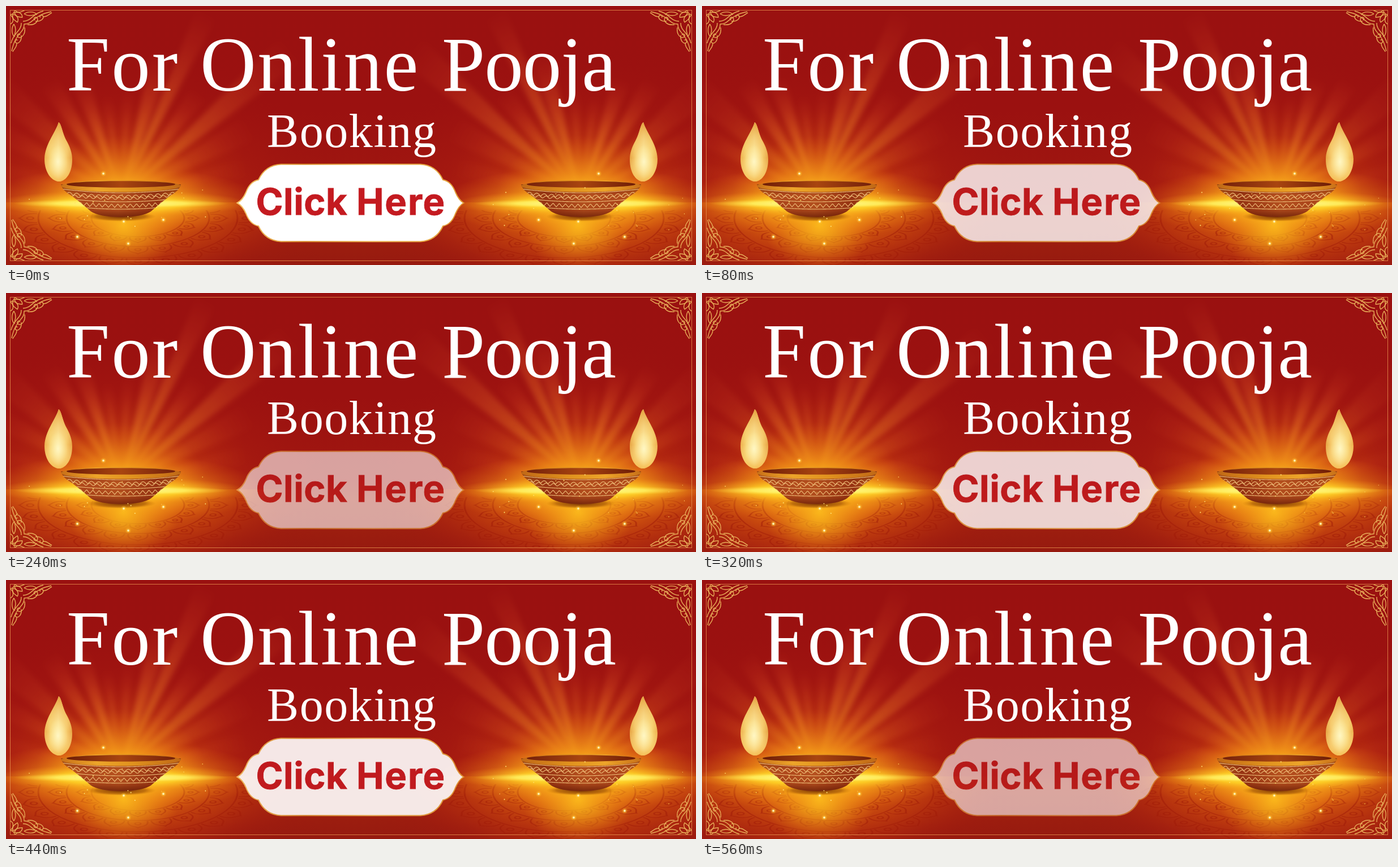
Recreate the animation shown at these times as an HTML page with a canvas. Size 1219 by 459 pixels, loop 0.6 s.

```html
<!DOCTYPE html>
<html lang="en">
<head>
<meta charset="utf-8">
<title>Online Pooja Booking</title>
<style>
  html, body { margin: 0; width: 100%; height: 100%; overflow: hidden; background: #9b1211; }
  canvas, svg { position: absolute; left: 0; top: 0; width: 1219px; height: 459px; }
  .title { font-family: "Liberation Serif", "Times New Roman", serif; fill: #fff; }
  .label { font: 700 65px Inter, sans-serif; fill: #c41a20; stroke: #c41a20; stroke-width: .8; }
  /* Each leg runs 200 ms in five hard steps */
  #button { animation: blink 600ms steps(5, end) infinite; }
  @keyframes blink {
    0% { opacity: 1; }
    33.3333% { opacity: .5; }
    66.6667% { opacity: 1; }
    100% { opacity: .5; }
  }
</style>
</head>
<body>
<canvas id="scene" width="1219" height="459"></canvas>
<svg viewBox="0 0 1219 459">
  <defs>
    <linearGradient id="gold" x1="0" x2="1" y1="0" y2="0">
      <stop offset="0" stop-color="#f3c468"/>
      <stop offset=".3" stop-color="#d98a26"/>
      <stop offset=".6" stop-color="#efb653"/>
      <stop offset="1" stop-color="#e09a35"/>
    </linearGradient>
  </defs>
  <g class="title">
    <g font-size="137">
      <text x="107" y="150" letter-spacing="3">For</text>
      <text x="343" y="150" letter-spacing="2.500">Online</text>
      <text x="770" y="150" letter-spacing="-1">Pooja</text>
    </g>
    <text x="461" y="250" font-size="84" letter-spacing="1.600">Booking</text>
  </g>
  <g id="button">
    <path fill="#fff" stroke="url(#gold)" stroke-width="2" d="M408.500 349
      Q418 344 424 330 Q431 311 446 308 Q458 282 486 280.500 H732
      Q760 282 772 308 Q787 311 794 330 Q800 344 808.500 349
      Q800 354 794 368 Q787 387 772 390 Q760 416 732 417.500 H486
      Q458 416 446 390 Q431 387 424 368 Q418 354 408.500 349Z"/>
    <text class="label" x="441.500" y="370" letter-spacing=".5">Click</text>
    <text class="label" x="619" y="370" letter-spacing="1.800">Here</text>
  </g>
</svg>
<script>
const W = 1219, H = 459, TAU = Math.PI * 2;
const CX = 203; // middle of the left lamp
const c = document.getElementById('scene').getContext('2d');

let seed = 7;
const rand = () => (seed = seed * 16807 % 2147483647) / 2147483647;

function gradient(g, stops) {
  stops.forEach(([at, color]) => g.addColorStop(at, color));
  return g;
}

// Soft elliptical light
function glow(x, y, rx, ry, stops) {
  c.save();
  c.translate(x, y);
  c.scale(rx, ry);
  c.fillStyle = gradient(c.createRadialGradient(0, 0, 0, 0, 0, 1), stops);
  c.beginPath();
  c.arc(0, 0, 1, 0, TAU);
  c.fill();
  c.restore();
}

function ellipse(x, y, rx, ry, fill) {
  c.beginPath();
  c.ellipse(x, y, rx, ry, 0, 0, TAU);
  if (fill) { c.fillStyle = fill; c.fill(); } else c.stroke();
}

function backdrop() {
  c.fillStyle = gradient(c.createLinearGradient(0, 0, 0, H), [
    [0, '#9a1110'], [.4, '#9b1110'], [.72, '#a01710'], [.8, '#a5220f'], [1, '#961a0f']]);
  c.fillRect(0, 0, W, H);
}

function rays() {
  // direction in degrees, half width in degrees, reach, strength
  const beams = [
    [-168, 4, 230, .16], [-152, 4, 250, .24], [-138, 5, 300, .22], [-122, 4, 240, .42],
    [-109, 4, 220, .5], [-98, 3, 180, .35], [-86, 3, 190, .3], [-74, 4, 270, .45],
    [-65, 3, 360, .42], [-53, 4, 230, .4], [-41, 4, 400, .34], [-28, 5, 260, .22], [-13, 4, 230, .16]];
  c.save();
  c.globalCompositeOperation = 'screen';
  c.filter = 'blur(5px)';
  for (const [deg, half, reach, power] of beams) {
    const a = deg * TAU / 360, h = half * TAU / 360;
    c.fillStyle = gradient(c.createRadialGradient(CX, 338, 20, CX, 338, reach), [
      [0, `rgba(255,170,30,${power * 1.3})`], [.5, `rgba(250,125,30,${power * .7})`], [1, 'rgba(220,70,30,0)']]);
    c.beginPath();
    c.moveTo(CX, 338);
    c.arc(CX, 338, reach, a - h, a + h);
    c.fill();
  }
  c.restore();
}

function mandala() {
  c.save();
  c.beginPath();
  c.rect(0, 362, 600, 97);
  c.clip();
  c.translate(CX + 30, 376);
  c.scale(1, .4);
  c.strokeStyle = 'rgba(160,26,8,.5)';
  c.lineWidth = 3;
  for (const [r, depth, count] of [[82, 26, 16], [126, 32, 20], [176, 34, 24]]) {
    c.beginPath();
    c.arc(0, 0, r, 0, TAU);
    c.stroke();
    for (let i = 0; i < count; i++) {
      const step = TAU / count;
      c.save();
      c.rotate(i * step);
      const w = Math.tan(step / 2) * r * .85;
      c.beginPath();
      c.moveTo(r + 2, -w);
      c.bezierCurveTo(r + depth * .8, -w * 1.2, r + depth * .8, -w * .2, r + depth, 0);
      c.bezierCurveTo(r + depth * .8, w * .2, r + depth * .8, w * 1.2, r + 2, w);
      c.stroke();
      c.beginPath();
      c.arc(r + depth * .42, 0, w * .3, 0, TAU);
      c.stroke();
      c.restore();
    }
  }
  c.restore();
}

function light() {
  glow(CX, 340, 380, 260, [
    [0, 'rgba(222,90,14,.85)'], [.35, 'rgba(202,62,14,.56)'], [.65, 'rgba(176,32,16,.24)'], [1, 'rgba(160,20,16,0)']]);
  rays();
  glow(CX, 335, 150, 105, [
    [0, 'rgba(255,200,30,.9)'], [.5, 'rgba(245,150,22,.5)'], [1, 'rgba(225,100,16,0)']]);
  c.save();
  c.beginPath();
  c.rect(-10, 348, W, 120);
  c.clip();
  glow(CX, 348, 340, 140, [
    [0, 'rgba(240,150,18,1)'], [.35, 'rgba(220,104,16,.85)'], [.65, 'rgba(192,62,14,.6)'], [1, 'rgba(165,30,14,0)']]);
  c.restore();
  mandala();
  glow(CX + 5, 388, 100, 80, [
    [0, 'rgba(255,205,30,.95)'], [.5, 'rgba(246,168,24,.5)'], [1, 'rgba(235,130,20,0)']]);
  glow(CX, 347, 250, 62, [
    [0, 'rgba(255,215,40,.95)'], [.45, 'rgba(252,180,28,.6)'], [1, 'rgba(235,110,18,0)']]);
  glow(CX, 350, 225, 24, [
    [0, 'rgba(255,240,70,1)'], [.5, 'rgba(255,215,40,.75)'], [1, 'rgba(245,140,20,0)']]);
  glow(CX, 350, 190, 9, [
    [0, 'rgba(255,252,170,1)'], [.6, 'rgba(255,242,100,.8)'], [1, 'rgba(255,200,50,0)']]);
}

function bowl() {
  glow(CX, 373, 62, 9, [[0, 'rgba(100,30,0,.9)'], [.7, 'rgba(140,60,0,.5)'], [1, 'rgba(200,110,0,0)']]);
  c.save();
  c.beginPath();
  c.moveTo(97, 316);
  c.quadraticCurveTo(100, 328, 117, 337);
  c.quadraticCurveTo(133, 349, 150, 364);
  c.quadraticCurveTo(165, 374, CX, 374);
  c.quadraticCurveTo(241, 374, 256, 364);
  c.quadraticCurveTo(273, 349, 289, 337);
  c.quadraticCurveTo(306, 328, 309, 316);
  c.closePath();
  c.fillStyle = gradient(c.createLinearGradient(97, 0, 309, 0), [
    [0, '#c4641c'], [.2, '#b0481c'], [.48, '#b8521f'], [.8, '#983413'], [1, '#bd621c']]);
  c.fill();
  c.clip();
  c.fillStyle = gradient(c.createLinearGradient(0, 320, 0, 374), [
    [0, 'rgba(80,10,0,.4)'], [.3, 'rgba(80,10,0,0)'], [.75, 'rgba(80,10,0,.1)'], [1, 'rgba(80,15,0,.6)']]);
  c.fillRect(90, 316, 230, 60);

  // Painted bands follow the curve of the side
  const band = (y, amp, period, wave) => {
    c.beginPath();
    for (let x = 100; x <= 306; x++) {
      const sag = 7 * (1 - ((x - CX) / 106) ** 2);
      c.lineTo(x, y + sag + amp * wave((x - CX) / period));
    }
    c.stroke();
  };
  const zigzag = t => Math.abs((t % 1 + 1) % 1 - .5) * 4 - 1;
  const scallop = t => -Math.abs(Math.cos(t * Math.PI)) * 2 + 1;
  c.strokeStyle = '#eebd78';
  c.lineWidth = 1.1;
  band(324, 0, 1, zigzag);
  band(331, 2.6, 13, scallop);
  band(334, 2, 13, t => Math.sin(t * TAU));
  band(340, 0, 1, zigzag);
  band(347, 3.2, 11, zigzag);
  band(353, 0, 1, zigzag);
  c.restore();

  ellipse(CX, 319, 106, 10.5, gradient(c.createLinearGradient(97, 0, 309, 0), [
    [0, '#c87018'], [.3, '#eda52a'], [.6, '#e0921e'], [1, '#c06816']]));
  ellipse(CX, 316, 96, 5.8, gradient(c.createLinearGradient(106, 0, 300, 0), [
    [0, '#6e1c06'], [.5, '#a84510'], [1, '#74200a']]));
}

function flame() {
  c.beginPath();
  c.moveTo(93, 206);
  c.bezierCurveTo(98, 209, 99, 224, 107, 239);
  c.bezierCurveTo(113, 250, 117, 260, 117, 272);
  c.bezierCurveTo(117, 294, 107, 310, 94, 311);
  c.bezierCurveTo(79, 310, 68, 293, 68, 271);
  c.bezierCurveTo(69, 244, 87, 226, 93, 206);
  c.fillStyle = gradient(c.createLinearGradient(68, 0, 117, 0), [
    [0, '#eeb04e'], [.2, '#f7d272'], [.5, '#fce69a'], [.8, '#f6ca6c'], [1, '#e7a443']]);
  c.fill();
  c.save();
  c.clip();
  c.fillStyle = gradient(c.createLinearGradient(0, 206, 0, 311), [
    [0, 'rgba(226,152,50,.9)'], [.35, 'rgba(240,185,90,.3)'], [.6, 'rgba(255,240,170,0)'], [1, 'rgba(242,178,66,.75)']]);
  c.fillRect(60, 200, 70, 115);
  glow(92, 276, 17, 30, [[0, 'rgba(255,248,200,.9)'], [1, 'rgba(255,240,170,0)']]);
  c.restore();
}

function sparks() {
  const spark = (x, y, r) => {
    glow(x, y, r * 2.5, r * 2.5, [[0, 'rgba(255,225,90,.9)'], [1, 'rgba(255,190,40,0)']]);
    ellipse(x, y, r * .8, r * .8, '#fff6c0');
  };
  for (const [x, y] of [[172, 297], [208, 382], [126, 409], [278, 379], [216, 421]]) spark(x, y, 2.2);
  for (let i = 0; i < 20; i++) spark(20 + rand() * 360, 322 + rand() * 75, .4 + rand() * .4);
}

function leaf(x, y, deg, len, w) {
  c.save();
  c.translate(x, y);
  c.rotate(deg * TAU / 360);
  c.beginPath();
  c.moveTo(0, 0);
  c.bezierCurveTo(len * .3, -w, len * .8, -w, len, 0);
  c.bezierCurveTo(len * .7, w * .3, len * .4, w, 0, 0);
  c.stroke();
  c.restore();
}

function corner(sx, sy) {
  c.save();
  c.translate(sx > 0 ? 8 : W - 8, sy > 0 ? 8 : H - 8);
  c.scale(sx, sy);
  c.beginPath();
  c.rect(0, 0, 74, 74);
  c.clip();
  c.strokeStyle = '#e8ac58';
  c.lineWidth = 1.4;
  ellipse(0, 0, 7, 7);
  for (let a = 0; a <= 90; a += 30) leaf(8 * Math.cos(a * TAU / 360), 8 * Math.sin(a * TAU / 360), a, 16, 6);
  // Scrolls along one edge, repeated across the diagonal
  const scrolls = new Path2D(`M24 24 C40 25 38 9 72 2 M22 19 C36 20 40 4 58 1
    M30 25 C44 27 50 18 47 13 C43 10 39 15 43 17
    M44 19 C54 20 60 14 57 9 C53 7 50 11 53 12 M58 11 C66 11 68 6 73 4`);
  for (const flip of [false, true]) {
    c.save();
    if (flip) c.transform(0, 1, 1, 0, 0, 0);
    c.stroke(scrolls);
    leaf(24, 6, 2, 22, 5);
    c.restore();
  }
  c.restore();
}

function mirrored(draw) {
  draw();
  c.save();
  c.translate(W, 0);
  c.scale(-1, 1);
  draw();
  c.restore();
}

backdrop();
mirrored(light);
mirrored(() => { bowl(); flame(); sparks(); });
c.strokeStyle = 'rgba(232,146,78,.8)';
c.lineWidth = 1;
c.strokeRect(7.5, 7.5, W - 15, H - 15);
for (const sx of [1, -1]) for (const sy of [1, -1]) corner(sx, sy);
</script>
</body>
</html>
```
